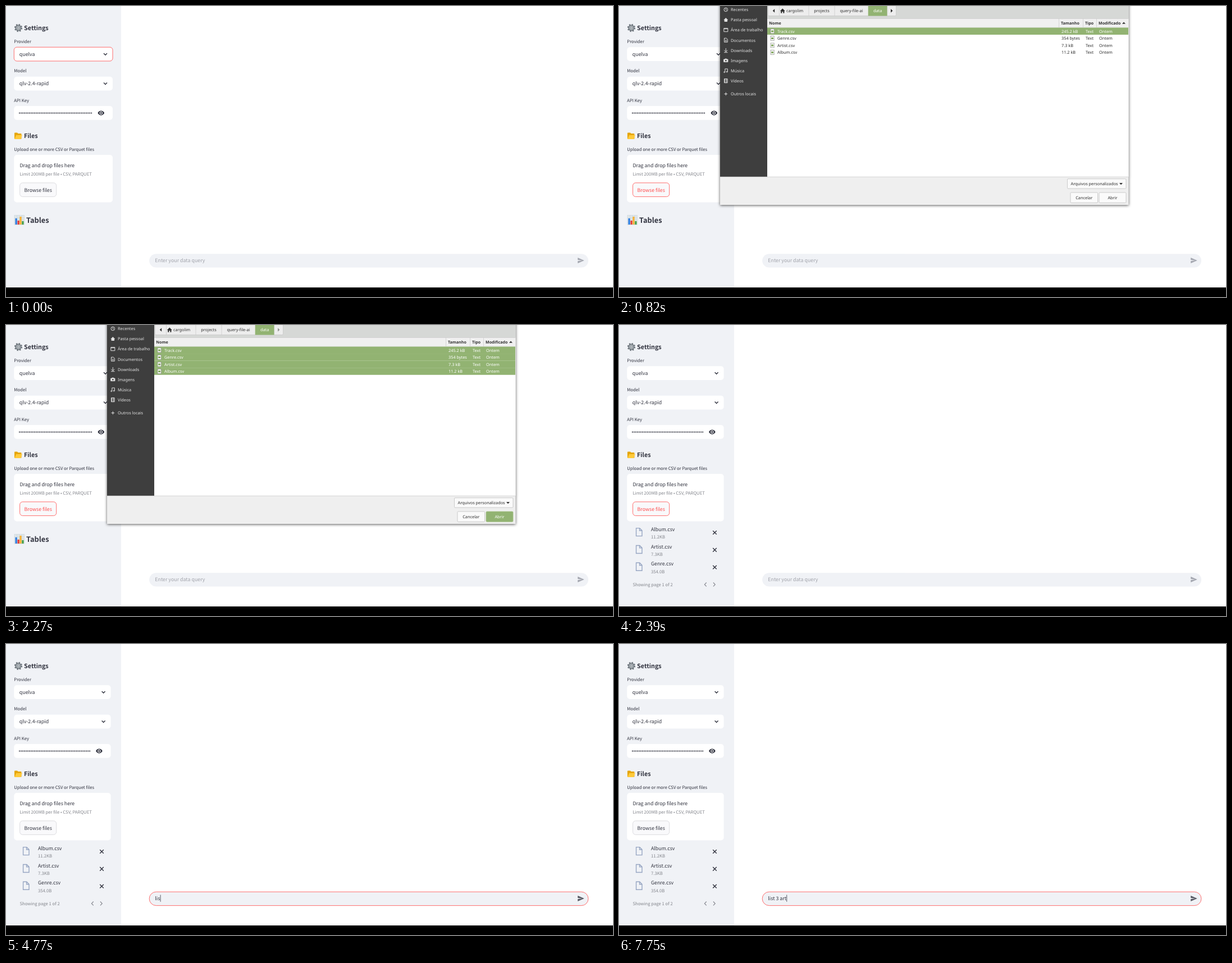
Write an HTML page that moves like this. It is 1081 px wide and 518 px high and loops after 8 s.

```html
<!DOCTYPE html>
<html lang="en">
<head>
<meta charset="utf-8">
<style>
  html, body { margin: 0; width: 100%; height: 100%; overflow: hidden; background: #fff; }
  svg { display: block; width: 1081px; height: 518px; }
  text { font: 8.83px "Noto Sans CJK JP", "Noto Sans CJK SC", "Noto Sans", sans-serif; fill: #31333f;
         white-space: pre; text-rendering: geometricPrecision; }
  .small { font-size: 7.71px; }
  .gray { fill: #83858c; }
  .hint { fill: #a0a2aa; }
  .head { font-size: 10.8px; font-weight: 600; }
  .big { font-size: 12.75px; font-weight: 600; }
  .mid { text-anchor: middle; }
  .line { fill: none; stroke: #31333f; stroke-width: 1.4; }
  #dialog { filter: drop-shadow(0 1px 2.5px #000a); }
  #dialog text { font: 7.33px "Noto Sans", "Open Sans", sans-serif; fill: #303030; }
  #dialog .title { font-weight: 600; font-size: 7.1px; }
  #dialog .place { fill: #e4e4e4; }
  #dialog .lit text, #dialog text.lit { fill: #fff; }
  .icon { fill: none; stroke: #e0e0e0; stroke-width: 1; }
</style>
</head>
<body>
<svg id="stage" viewBox="0 0 1081 518"></svg>
<script>
const LOOP = 8000, GREEN = '#92b372', RED = '#ff4b4b', INK = '#31333f';
const text = (x, y, s, cls = '', id = '') => `<text x="${x}" y="${y}" class="${cls}" id="${id}">${s}</text>`;
const rect = (x, y, w, h, fill, more = '') =>
  `<rect x="${x}" y="${y}" width="${w}" height="${h}" fill="${fill}" ${more}/>`;
const path = (d, more) => `<path d="${d}" ${more}/>`;
const at = (x, y, inner, more = '') => `<g transform="translate(${x} ${y})" ${more}>${inner}</g>`;
const box = (y, h, id = '') => rect(14.3, y, 175.7, h, '#fff', `rx="5" class="field" id="${id}"`);
const chevron = y => at(177, y, path('M-3-1.5L0 1.5L3-1.5', 'class="line"'), `class="slide" data-y="${y}"`);

const gear = at(22, 39,
  '<circle r="6.2" fill="none" stroke="#6d757c" stroke-width="1.9" stroke-dasharray="2.43 2.43"/>' +
  '<circle r="4.7" fill="#c3c9cd" stroke="#6d757c" stroke-width="1.7"/>' +
  path('M-4 0H4M-2-3.5L2 3.5M2-3.5L-2 3.5', 'stroke="#7d858b" stroke-width=".8"') +
  '<circle r="1.6" fill="#e7eaec" stroke="#6d757c" stroke-width=".8"/>');

const folder = path('M15 236.5V226.5q0-1 1-1h4l1.5 1.5h5q1 0 1 1v8.5z', 'fill="#e5a50a"') +
  path('M15.2 237l2.6-6.6q.3-.7 1-.7h10l-2.5 6.6q-.3.7-1 .7z', 'fill="#ffca3a"');

const chart = rect(15, 372.5, 17.5, 17, '#dfe7ea', 'stroke="#c3cdd2" stroke-width=".5"') +
  path('M15 377h17.5M15 381h17.5M15 385h17.5M19.5 372.5v17M24 372.5v17M28 372.5v17',
    'stroke="#bac8ce" stroke-width=".4"') +
  rect(16.5, 378, 3.2, 11, '#2f7de1') + rect(20.5, 382, 3.2, 7, '#e53935') +
  rect(24.4, 375, 3.2, 14, '#f9b233') + rect(28.3, 383, 3.2, 6, '#43a047');

const eye = path('M12 4.5C7 4.5 2.73 7.61 1 12c1.73 4.39 6 7.5 11 7.5s9.27-3.11 11-7.5c-1.73-4.39-6-7.5-11-7.5z' +
  'M12 17a5 5 0 110-10 5 5 0 010 10zm0-8a3 3 0 100 6 3 3 0 000-6z',
  `fill="${INK}" transform="scale(.53) translate(-12 -12)"`);

const sidebar = rect(0, 0, 205, 501, '#f0f2f6') +
  gear + text(32, 43, 'Settings', 'head') +
  text(14.3, 65.7, 'Provider', 'small') + box(73.3, 24.7, 'provider') + text(23.8, 89, 'quelva') + chevron(85.7) +
  text(14.3, 118, 'Model', 'small') + box(125.8, 24.7) + text(23.8, 141.4, 'qlv-2.4-rapid') + chevron(138) +
  text(14.3, 170.5, 'API Key', 'small') + box(178, 24.7) +
  path('', `id="dots" fill="none" stroke="${INK}" stroke-width="2.1" stroke-linecap="round" stroke-dasharray="0 2.98"`) +
  at(169.3, 190.4, eye, 'class="slide" data-y="190.4"') +
  folder + text(32, 235, 'Files', 'head') +
  text(14.3, 257.7, 'Upload one or more CSV or Parquet files', 'small') +
  box(265, 84.5) + text(24.4, 287, 'Drag and drop files here') +
  text(24.4, 301.9, 'Limit 200MB per file • CSV, PARQUET', 'small gray') +
  rect(24.6, 314.8, 65.1, 24.6, '#f9f9fb', 'rx="5" stroke-width=".8" id="browse"') +
  text(57.2, 330.6, 'Browse files', 'mid', 'browseText') +
  `<g id="tables">${chart}${text(36, 386, 'Tables', 'big')}</g>`;

const uploads = [['Album.csv', '11.2KB'], ['Artist.csv', '7.3KB'], ['Genre.csv', '354.0B']].map(([name, size], i) =>
  at(0, 30.85 * i,
    path('M30.6 361.6h6.2l4.2 4.2v9.8H30.6zM36.6 361.8v4.2h4.2', 'fill="none" stroke="#97a6c3" stroke-width="1.4"') +
    text(57, 366.8, name) + text(57, 380.3, size, 'small gray') +
    path('M167.2 366.2l6.6 6.6M173.8 366.2l-6.6 6.6', 'class="line"'))).join('') +
  text(24.4, 465, 'Showing page 1 of 2', 'small gray') +
  path('M155.7 458.5l-3.3 3.4 3.3 3.4M167.9 458.5l3.3 3.4-3.3 3.4', 'fill="none" stroke="#85878f" stroke-width="1.2"');

const prompt = rect(255.2, 441.2, 781.8, 24.4, '#f0f2f6', 'rx="12.2" stroke-width=".8" id="prompt"') +
  text(265.3, 455.9, 'Enter your data query', 'hint', 'hint') + text(265.3, 455.9, '', '', 'query') +
  rect(0, 446.5, .8, 12.3, INK, 'id="caret"') +
  path('M2 21l21-9L2 3v7l15 2-15 2z', 'id="send" transform="translate(1024 453) scale(.55) translate(-12.5 -12)"');

const places = [
  ['Recentes', 6.5, '<circle r="3.3"/><path d="M0-2V0L1.6 1"/>'],
  ['Pasta pessoal', 24.6, '<path d="M-4 .5L0-3.5L4 .5H2.7V3.5H-2.7V.5z" fill="#e0e0e0" stroke="none"/>'],
  ['Área de trabalho', 42.7, '<path d="M-3.5-3h7v6h-7zM-3.5-2h7"/>'],
  ['Documentos', 60.8, '<path d="M-2.8-3.5h3.8l2 2v5h-5.8zM-1.2 0h2.6M-1.2 1.8h2.6"/>'],
  ['Downloads', 78.9, '<path d="M0-3.8V2.5M-3-.3L0 2.7L3-.3M-3.2 3.8h6.4"/>'],
  ['Imagens', 97, '<path d="M-3.6-2h1.8l.8-1h2l.8 1h1.8v4.6h-7.2z" fill="#e0e0e0"/><circle r="1.3" fill="#3e3e3e" stroke="none" cy=".3"/>'],
  ['Música', 115.1, '<path d="M-1.5 2.5V-3.2H3V1.8"/><circle cx="-2.6" cy="2.6" r="1"/><circle cx="2" cy="2" r="1"/>'],
  ['Vídeos', 133.2, '<path d="M-2.8-3.5h5.6v7h-5.6zM-1.3-3.5v7M1.3-3.5v7"/>'],
  ['Outros locais', 156.5, '<path d="M-2.8 0h5.6M0-2.8v5.6"/>']
].map(([name, y, icon]) => at(190.3, y, icon, 'class="icon"') + text(199, y + 2.7, name, 'place')).join('');

const files = [['Track', '245.2 kB'], ['Genre', '354 bytes'], ['Artist', '7.3 kB'], ['Album', '11.2 kB']]
  .map(([name, size], i) => at(0, 38.5 + 12.55 * i,
    rect(264, 0, 643, 12.6, GREEN, 'class="mark"') +
    rect(270, 2.4, 6.2, 8, '#fafafa', 'stroke="#8b8f88" stroke-width=".7"') +
    rect(271.2, 5, 3.8, 3, '#7fa65a') +
    text(282, 9, name + '.csv') + text(788, 9, size) + text(831, 9, 'Text') + text(855, 9, 'Ontem'),
    'class="row"')).join('');

const button = (x, y, w, h, id = '') =>
  rect(x, y, w, h, '#fafafa', `rx="1.5" stroke="#bfbfbf" stroke-width=".8" id="${id}"`);

const dialog = rect(180, -12, 727.5, 366, '#efefef') + rect(180, -12, 84, 316, '#3e3e3e') + places +
  rect(264, -12, 643.5, 34.5, '#d6d8d6') +
  rect(265.5, -8, 228, 25.6, '#ededed', 'rx="2" stroke="#c4c4c4" stroke-width=".7"') +
  path('M285.5 0V17.5M338 0V17.5M384 0V17.5M477.5 0V17.5', 'stroke="#c8c8c8" stroke-width=".7"') +
  rect(443.7, -8, 33.8, 25.6, GREEN) +
  path('M277.2 5.3v6.4l-3.5-3.2z', 'fill="#303030"') + path('M484 5.3v6.4l3.5-3.2z', 'id="next"') +
  path('M286.8 9L291.3 4.4L295.8 9H294.4V12.8H292.3V10H290.3V12.8H288.2V9z', 'fill="#303030"') +
  text(298, 11.2, 'cargolim') + text(361, 11.2, 'projects', 'mid') +
  text(414, 11.2, 'query-file-ai', 'mid') + text(460.6, 11.2, 'data', 'mid lit') +
  rect(264, 22.5, 643.5, 16, '#f0f0f0') +
  path('M264 22.5H907M264 38.3H907M783.5 22.5V38.3M826.5 22.5V38.3M850.5 22.5V38.3',
    'stroke="#c9c9c9" stroke-width=".7"') +
  [[267.3, 'Nome'], [787, 'Tamanho'], [830, 'Tipo'], [854, 'Modificado']]
    .map(([x, s]) => text(x, 33, s, 'title')).join('') +
  path('M896 31.7h6l-3-3.2z', 'fill="#303030"') +
  rect(264, 38.5, 643.5, 265.5, '#fff') + files +
  path('M180 304.2H907.5', 'stroke="#c9c9c9" stroke-width=".7"') +
  button(798.5, 307.7, 104.5, 17.3) + text(804.5, 319, 'Arquivos personalizados') +
  path('M891 315h6l-3 3.2z', 'fill="#303030"') +
  button(804, 332, 48.5, 18.3) + text(828.2, 344, 'Cancelar', 'mid') +
  button(855, 332, 48, 18.3, 'open') + text(879, 344, 'Abrir', 'mid', 'openText');

document.getElementById('stage').innerHTML = rect(0, 0, 1081, 518, '#fff') + sidebar +
  `<g id="uploads">${uploads}</g>` + rect(201, 0, 4, 337, '#cbd2df', 'rx="2" id="scroll"') +
  prompt + rect(0, 501, 1081, 17, '#000') + `<g id="dialog">${dialog}</g>`;

const $ = id => document.getElementById(id);
const set = (id, attrs) => Object.entries(attrs).forEach(([k, v]) => $(id).setAttribute(k, v));
const show = (id, on) => set(id, { visibility: on ? 'visible' : 'hidden' });

// Key presses: time and key, '<' is backspace
const FOCUS = 3690, CARET_ON = 340;
const keys = [[4420, 'l'], [4670, 'i'], [4770, 's'], [4970, 't'], [5120, ' '], [5670, '3'], [5770, ' '],
  [6030, 'a'], [6120, 'r'], [6270, 't'], [6380, 's'], [6780, 'i'], [7030, 's'], [7300, '<'], [7530, '<'], [7690, '<']];

function render(t) {
  const loaded = t >= 2390, focused = t >= FOCUS, during = (a, b) => t >= a && t < b;

  const hot = during(540, FOCUS);
  set('provider', { stroke: t < 730 ? RED : 'none', 'stroke-width': .8 });
  set('browse', { stroke: hot ? RED : '#d3d4d9' });
  $('browseText').style.fill = hot ? RED : INK;

  const shift = loaded ? 3.4 : 0;
  document.querySelectorAll('.field').forEach(f => f.setAttribute('width', 175.7 - shift));
  document.querySelectorAll('.slide').forEach((g, i) =>
    g.setAttribute('transform', `translate(${(i < 2 ? 177 : 169.3) - shift} ${g.dataset.y})`));
  set('dots', { d: `M24 190.6H${153.5 - shift}` });
  show('tables', !loaded);
  show('uploads', loaded);
  show('scroll', during(2940, 3310));

  show('dialog', during(820, 2390));
  document.querySelectorAll('.row').forEach((row, i) => {
    const lit = i === 0 || t >= 1550;
    row.classList.toggle('lit', lit);
    row.firstChild.style.opacity = +lit;
  });
  set('next', { fill: t < 870 ? '#303030' : '#929492' });
  const pressed = t >= 2230;
  set('open', { fill: pressed ? GREEN : '#fafafa', stroke: pressed ? '#a6c28a' : '#bfbfbf' });
  $('openText').classList.toggle('lit', pressed);

  let typed = '', last = FOCUS;
  for (const [time, key] of keys) {
    if (time > t) break;
    typed = key === '<' ? typed.slice(0, -1) : typed + key;
    last = time;
  }
  $('query').textContent = typed;
  show('hint', !typed);
  set('prompt', { stroke: focused ? RED : 'none' });
  set('send', { fill: typed ? '#555761' : '#a3a6af' });
  show('caret', focused && t - last < CARET_ON);
  set('caret', { x: 265.6 + (typed ? $('query').getComputedTextLength() : 0) });
}

(function tick() {
  render(performance.now() % LOOP);
  requestAnimationFrame(tick);
})();
</script>
</body>
</html>
```
